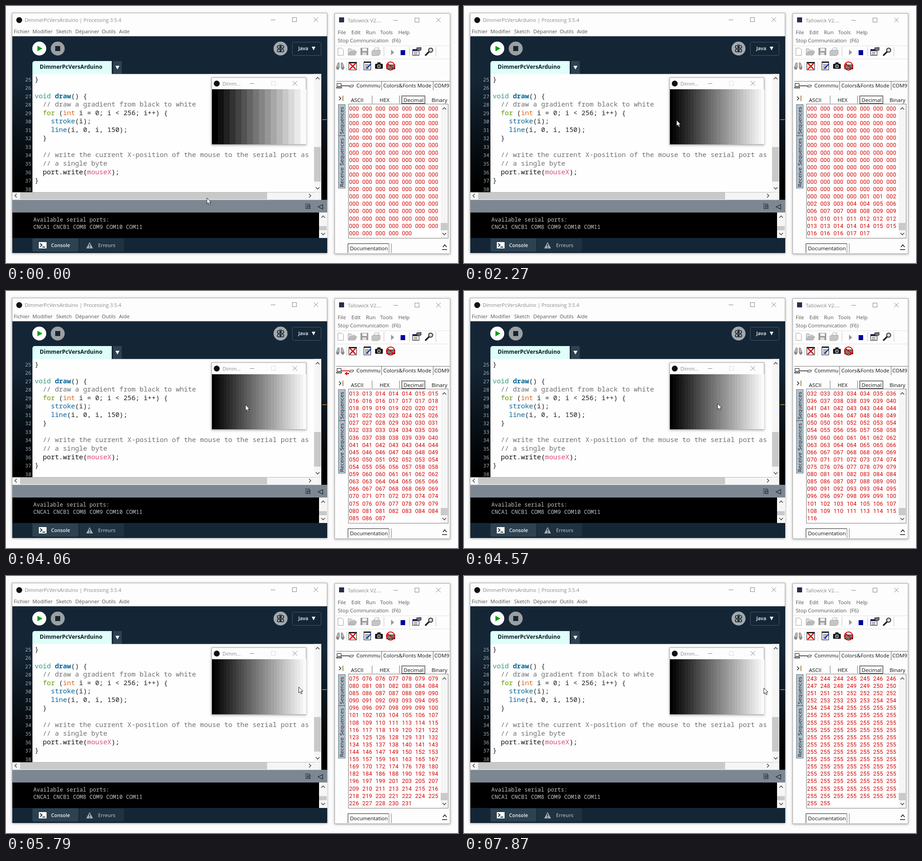
Animation of 992 by 565 pixels, one loop 7990 ms. Source, as an HTML page with a canvas:

```html
<!DOCTYPE html>
<html lang="fr">
<head>
<meta charset="utf-8">
<title>Dimmer</title>
<style>
html, body { margin: 0; width: 100%; height: 100%; overflow: hidden; background: #fcfcfc; }
canvas { display: block; }
</style>
</head>
<body>
<canvas id="stage" width="992" height="565"></canvas>
<script>
const W = 992, H = 565, LOOP = 7990, STEP = LOOP / 58;
const UI = '"Open Sans", "Noto Sans", sans-serif';
const MONO = '"Noto Sans Mono", "DejaVu Sans Mono", monospace';
const NAVY = '#142636', INK = '#111', GREY = '#888', THUMB = '#c9c9c9', RAIL = '#f5f5f5';
const view = document.getElementById('stage').getContext('2d');
const base = document.createElement('canvas');
base.width = W;
base.height = H;
let c = base.getContext('2d');

function box(x, y, w, h, fill, line) {
  if (fill) { c.fillStyle = fill; c.fillRect(x, y, w, h); }
  if (line) { c.strokeStyle = line; c.lineWidth = 1; c.strokeRect(x + .5, y + .5, w - 1, h - 1); }
}
function round(x, y, w, h, r, fill, line) {
  c.beginPath();
  c.roundRect(x, y, w, h, r);
  paint(fill, line);
}
function paint(fill, line, width = 1) {
  if (fill) { c.fillStyle = fill; c.fill(); }
  if (line) { c.strokeStyle = line; c.lineWidth = width; c.stroke(); }
}
function disc(x, y, r, fill, line, width) {
  c.beginPath();
  c.arc(x, y, r, 0, 7);
  paint(fill, line, width);
}
function trace(points) {
  c.beginPath();
  for (let i = 0; i < points.length; i += 2) c.lineTo(points[i], points[i + 1]);
}
function path(points, line, width) {
  trace(points);
  paint(null, line, width);
}
function poly(points, fill, line, width) {
  trace(points);
  c.closePath();
  paint(fill, line, width);
}
function hline(x, y, w, line, width) { path([x, y + .5, x + w, y + .5], line, width); }
function vline(x, y, h, line, width) { path([x + .5, y, x + .5, y + h], line, width); }
function rules(x, y, w, n, gap, line) {
  for (let i = 0; i < n; i++) hline(x, y + i * gap, w, line);
}
function cross(x, y, r, line, width) {
  path([x - r, y - r, x + r, y + r], line, width);
  path([x - r, y + r, x + r, y - r], line, width);
}
function text(s, x, y, size, color, font = UI, weight = 400) {
  c.font = `${weight} ${size}px ${font}`;
  c.fillStyle = color;
  c.fillText(s, x, y);
  return c.measureText(s).width;
}
function chevron(x, y, dx, dy) {
  path(dx ? [x - dx * 2, y - 4, x + dx * 2, y, x - dx * 2, y + 4]
          : [x - 4, y - dy * 2, x, y + dy * 2, x + 4, y - dy * 2], '#505050', 1.6);
}
function scrollbar(x, y, w, h, thumbY, thumbH) {
  box(x, y, w, h, RAIL);
  box(x, thumbY, w - 1, thumbH, THUMB);
  chevron(x + w / 2, y + 9.5, 0, -1);
  chevron(x + w / 2, y + h - 9, 0, 1);
}
function shell(x, y, w, h) {
  c.save();
  c.shadowColor = 'rgba(0,0,0,.35)';
  c.shadowBlur = 5;
  c.shadowOffsetY = 1;
  box(x, y, w, h, '#fdfdfd');
  c.restore();
  box(x, y, w, h, null, '#adadad');
}
function controls(x, y, maxColor = GREY) {
  hline(x - 5, y, 10, GREY);
  box(x + 42, y - 5, 10, 10, null, maxColor);
  cross(x + 94, y, 5, GREY);
}

const CODE = [
  [['}', '#222']], [],
  [['void ', '#33997e'], ['draw', '#006699', 700], ['() {', '#222']],
  [['  // draw a gradient from black to white', '#707070']],
  [['  for', '#669900'], [' (', '#222'], ['int', '#e2661a'], [' i = 0; i < 256; i++) {', '#222']],
  [['    stroke', '#006699'], ['(i);', '#222']],
  [['    line', '#006699'], ['(i, 0, i, 150);', '#222']],
  [['  }', '#222']], [],
  [['  // write the current X-position of the mouse to the serial port as', '#707070']],
  [['  // a single byte', '#707070']],
  [['  port.write(', INK], ['mouseX', '#d94a7a'], [');', INK]],
  [['}', '#222']], []
];

function drawCode() {
  c.save();
  c.beginPath();
  c.rect(14, 149, 662, 260);
  c.clip();
  CODE.forEach((line, i) => {
    const y = 165.6 + i * 18.54;
    text(String(25 + i), 42, y, 11.2, '#a4aeb5', MONO);
    let x = 63;
    for (const [s, color, weight] of line) x += text(s, x, y, 14.75, color, MONO, weight);
  });
  c.restore();
}

function drawButtons() {
  disc(73, 93.5, 15.3, '#fff');
  poly([69, 87.5, 80, 93.5, 69, 99.5], '#00a010');
  disc(113.5, 93.5, 15.3, '#9c9fa1');
  box(108, 88, 11, 11, NAVY);
  disc(602.5, 93.5, 15.3, '#a3a9ad');
  for (const s of [-1, 1]) {
    for (const y of [90, 98]) disc(602.5 + s * 4, y, 3, null, '#1b2935', 1.7);
    path([602.5, 88, 602.5 + s * 2, 84], '#1b2935', 1.3);
  }
  vline(602, 87, 15, '#1b2935', 2);
  round(628.5, 79.5, 63, 29, 3, null, '#465765');
  text('Java', 641.5, 97, 10.9, '#f4f6f7', UI, 600);
  poly([671, 89.5, 679, 89.5, 675, 97.5], '#fff');
}

function drawEditor() {
  shell(13, 15, 692, 528);
  disc(29, 31, 6.5, INK);
  text('DimmerPcVersArduino | Processing 3.5.4', 41, 35, 11.05, '#8a8a8a');
  controls(586, 30);
  [['Fichier', 17], ['Modifier', 58], ['Sketch', 110], ['Dépanner', 152], ['Outils', 210], ['Aide', 248]]
    .forEach(([s, x]) => text(s, x, 60, 11.3, '#555'));

  const shade = c.createLinearGradient(0, 160, 0, 390);
  shade.addColorStop(0, NAVY);
  shade.addColorStop(1, '#000');
  box(14, 66.5, 691, 360, shade);
  drawButtons();

  round(58, 121, 174, 30, [5, 0, 0, 0], '#defffa');
  text('DimmerPcVersArduino', 74, 138, 12.1, '#0b1a24', UI, 700);
  box(235, 121, 19, 28, '#2d4150');
  poly([240, 131.5, 249, 131.5, 244.5, 139.5], '#fff');

  box(58, 149.5, 634, 260, '#fefefe');
  drawCode();
  scrollbar(676, 149.5, 16, 260, 310, 76);
  box(14, 409.5, 678, 17, RAIL);
  box(31, 410, 542, 15, THUMB);
  chevron(21.5, 417, -1, 0);
  chevron(667, 417, 1, 0);
  box(694, 249, 10, 1.5, '#c98a2a');

  box(14, 426.5, 691, 28, '#7c8792');
  c.setLineDash([2, 1]);
  box(657, 434, 9, 12, null, '#16222c');
  c.setLineDash([]);
  box(660, 437, 8, 9, null, '#16222c');
  hline(661, 441, 5, '#16222c', 1.5);
  poly([685, 441.5, 695, 436.5, 695, 446.5], null, '#16222c', 1.3);

  box(14, 454, 673, 56, '#000');
  ['Available serial ports:', 'CNCA1 CNCB1 COM8 COM9 COM10 COM11']
    .forEach((s, i) => text(s, 60, 474.4 + i * 16, 12.1, '#c4c4c4', MONO));
  scrollbar(687, 454, 18, 56, 484, 9);

  box(14, 510, 691, 33, NAVY);
  round(58, 511, 101, 29, [0, 0, 0, 3], '#2d4251');
  round(161, 511, 98, 29, [0, 0, 3, 0], '#1e3241');
  box(72, 519, 17, 14, '#fff');
  path([75, 522, 79, 525.5, 75, 529], NAVY, 1.8);
  hline(80, 529.5, 6, NAVY, 1.8);
  text('Console', 99, 530, 10.8, '#f1f4f5', UI, 600);
  poly([183.5, 519, 191, 533, 176, 533], '#a5adb3');
  vline(183, 523, 5, NAVY, 1.8);
  vline(183, 529.5, 2, NAVY, 1.8);
  text('Erreurs', 202, 530, 10.8, '#a5adb3', UI, 600);
}

function drawToolbar() {
  const g = '#a3a3a3';
  for (const x of [829, 885, 943]) vline(x, 90, 21, '#c4c4c4');
  for (const x of [747, 776]) vline(x, 122, 21, '#d5d5d5');

  // new, open, save, print
  poly([728.5, 92.5, 737, 92.5, 740.5, 96, 740.5, 108.5, 728.5, 108.5], '#fff', g);
  poly([751, 107, 751, 94, 757, 94, 759, 97, 766, 97, 766, 107], '#ddd', g);
  poly([751, 108, 755, 100, 770, 100, 766, 108], '#bbb', g);
  box(778, 92, 17, 16, '#9b9b9b');
  box(782, 93, 10, 6, '#f2f2f2');
  box(782, 102, 9, 6, '#dedede');
  poly([807, 98, 810, 92, 819, 92, 816, 98], '#fff', g);
  poly([803, 99, 807, 97, 821, 97, 821, 106, 817, 109, 803, 109], '#c5c5c5', g);

  // start, stop, settings, search
  poly([845, 96, 852, 102, 845, 108], '#9a9a9a');
  box(866, 97, 10, 11, '#0000a0');
  box(892, 95, 15, 14, '#fff', INK);
  box(892, 95, 15, 4, '#101060');
  rules(895, 101, 8, 3, 2.5, '#555');
  poly([901, 92, 911, 91, 911, 97, 903, 99], '#777', INK);
  path([920, 109, 930, 99], '#222', 3.5);
  disc(932, 97, 4.5, '#d7d7d7', '#333', 2);

  // find, clear, notes, snapshot, keyboard off
  for (const s of [-1, 1]) {
    poly([733.5 + s * 2, 125, 733.5 + s * 5, 125, 733.5 + s * 9, 136, 733.5 + s * 2, 136], '#b8b8b8', '#777');
    disc(733.5 + s * 5.5, 137, 3, GREY);
  }
  box(752, 123, 18, 18, '#fff', INK);
  box(752, 123, 18, 3, '#222');
  cross(761, 132.5, 6.5, '#e00000', 2.5);
  box(785, 122, 16, 19, '#fff', INK);
  box(785, 122, 16, 3, '#222');
  rules(788, 128, 8, 4, 3, '#333');
  path([791, 138, 801, 127], '#1744b8', 3);
  round(810, 127, 17, 11, 2, '#151515');
  box(815, 124, 7, 4, '#151515');
  disc(818.5, 132.5, 3, '#222', '#aaa', 2);
  box(835, 129, 19, 10, '#444', INK);
  rules(837, 131, 15, 3, 2.5, '#ccc');
  disc(844, 132, 9, null, '#d80000', 2);
  path([837, 126, 851, 138], '#d80000', 2);
}

function sideTab(s, top, bottom) {
  box(729, top, 16, bottom - top, '#b4c1cb', '#6d7c87');
  c.save();
  c.translate(741, bottom - 3);
  c.rotate(-Math.PI / 2);
  text(s, 0, 0, 11.1, '#15202a', '"DejaVu Sans", sans-serif');
  c.restore();
}

function drawMonitor() {
  shell(721, 16, 254, 529);
  box(731, 25, 11, 11, '#26304a');
  text('Tallowick V2....', 750, 36, 11.2, '#8a8a8a');
  controls(855, 31);
  [['File', 728], ['Edit', 758], ['Run', 790], ['Tools', 821], ['Help', 861]]
    .forEach(([s, x]) => text(s, x, 61.5, 11.5, '#555'));
  text('Stop Communication', 728, 80, 11.4, '#555');
  text('(F6)', 847, 80, 11.4, '#555');
  for (const y of [87, 116]) hline(722, y, 252, '#e2e2e2');
  drawToolbar();

  hline(725, 165, 249, '#777');
  for (const x of [824, 937]) vline(x, 165, 20, '#666');
  box(726, 170, 10, 7, '#fff', INK);
  box(725, 178, 12, 3, '#fff', INK);
  poly([754, 177, 756, 174, 763, 174, 761, 178, 754, 178], '#fff', INK);
  hline(736, 175, 18, INK, 1.4);
  [['Commmu', 769], ['Colors&Fonts Mode', 828], ['COM9', 940]]
    .forEach(([s, x]) => text(s, x, 179, 11.45, INK));

  path([731, 199, 735, 203, 731, 207], INK, 1.4);
  vline(739, 197, 12, '#8a6a20', 1.5);
  for (const x of [803, 863]) vline(x, 197, 17, '#777');
  box(868, 197, 52, 18, '#fff', '#222');
  c.setLineDash([1, 1]);
  box(870, 199, 48, 15, null, '#777');
  c.setLineDash([]);
  [['ASCII', 757], ['HEX', 820], ['Decimal', 872.5], ['Binary', 934]]
    .forEach(([s, x]) => text(s, x, 211, 11.6, INK));

  sideTab('Sequences', 216, 285);
  sideTab('Receive Sequences', 285, 401);
  box(751, 215, 220, 296, '#fff', '#7b7b7b');
  scrollbar(954, 216, 16, 294, 477, 16);

  path([750.5, 543, 750.5, 522.5, 841, 522.5], '#222');
  for (const x of [840, 845]) vline(x, 522, 21, '#777');
  text('Documentation', 755, 537, 11.45, INK);
  path([959, 530, 963, 525, 967, 530], INK, 1.5);
  hline(957, 535, 11, INK, 1.5);
}

function drawSketchFrame() {
  shell(451, 157, 208, 148);
  disc(462.5, 170.5, 6.5, INK);
  text('Dimm...', 475, 174.5, 11, '#8a8a8a');
  controls(540, 170, '#dcdcdc');
}

// piecewise linear curve through rows [x, ...values]
function curve(rows, x, column = 1) {
  let i = 1;
  while (i < rows.length - 1 && x >= rows[i][0]) i++;
  const a = rows[i - 1], b = rows[i];
  const k = Math.max(0, Math.min(1, (x - a[0]) / (b[0] - a[0])));
  return a[column] + (b[column] - a[column]) * k;
}

// step, pointer x, pointer y, bytes received
const MOTION = [[0, 440.5, 422, -100], [8, 447, 268, -30], [16, 466, 251, 40], [29, 525, 250, 150],
  [37, 587, 245, 216], [42, 642, 244, 257], [49, 659, 244, 319], [57, 657.5, 246, 387]];
// byte number, mouse position sent
const SENT = [[3, 0], [21, 10], [49, 21], [63, 32], [84, 45], [105, 59], [126, 70], [147, 85], [168, 101],
  [189, 123], [210, 155], [238, 209], [266, 243], [280, 251], [299, 255]];

function drawBytes(count) {
  const first = (Math.ceil(count / 7) - 18) * 7;
  c.letterSpacing = '.3px';
  for (let i = first; i < count; i++) {
    const n = i - first, row = Math.floor(n / 7);
    const s = String(Math.round(curve(SENT, i))).padStart(3, '0');
    text(s, 753 + n % 7 * 29, 229.8 + row * 16.12, 12.4, '#d40000', 'Roboto, sans-serif');
  }
  c.letterSpacing = '0px';
}

function drawGradient(bands) {
  const edge = i => Math.round(452 + i * 206.5 / bands);
  for (let i = 0; i < bands; i++) {
    const v = Math.round(i * 250 / (bands - 1));
    box(edge(i), 183, edge(i + 1) - edge(i), 121, `rgb(${v},${v},${v})`);
  }
}

function drawTraffic() {
  hline(737, 175, 17, '#e00000', 1.4);
  hline(747, 181, 6, '#e00000', 2.4);
  poly([743, 181.5, 748.5, 177.5, 748.5, 185.5], '#e00000');
}

function drawPointer(x, y) {
  c.save();
  c.translate(x + .5, y);
  poly([0, 0, 0, 13, 3, 10.3, 5.2, 15.2, 7.4, 14.2, 5.3, 9.6, 9, 9.3], '#fff', '#222');
  c.restore();
}

function render(now) {
  const step = Math.floor(now % LOOP / STEP);
  c = view;
  c.drawImage(base, 0, 0);
  drawGradient(step ? 32 : 16);
  drawBytes(Math.floor(curve(MOTION, step, 3)));
  if ((step + 8) % 9 < 2) drawTraffic();
  drawPointer(curve(MOTION, step, 1), curve(MOTION, step, 2));
}

box(0, 0, W, H, '#fcfcfc');
drawEditor();
drawMonitor();
drawSketchFrame();
const start = performance.now();
function tick() {
  render(performance.now() - start);
  requestAnimationFrame(tick);
}
tick();
</script>
</body>
</html>
```
